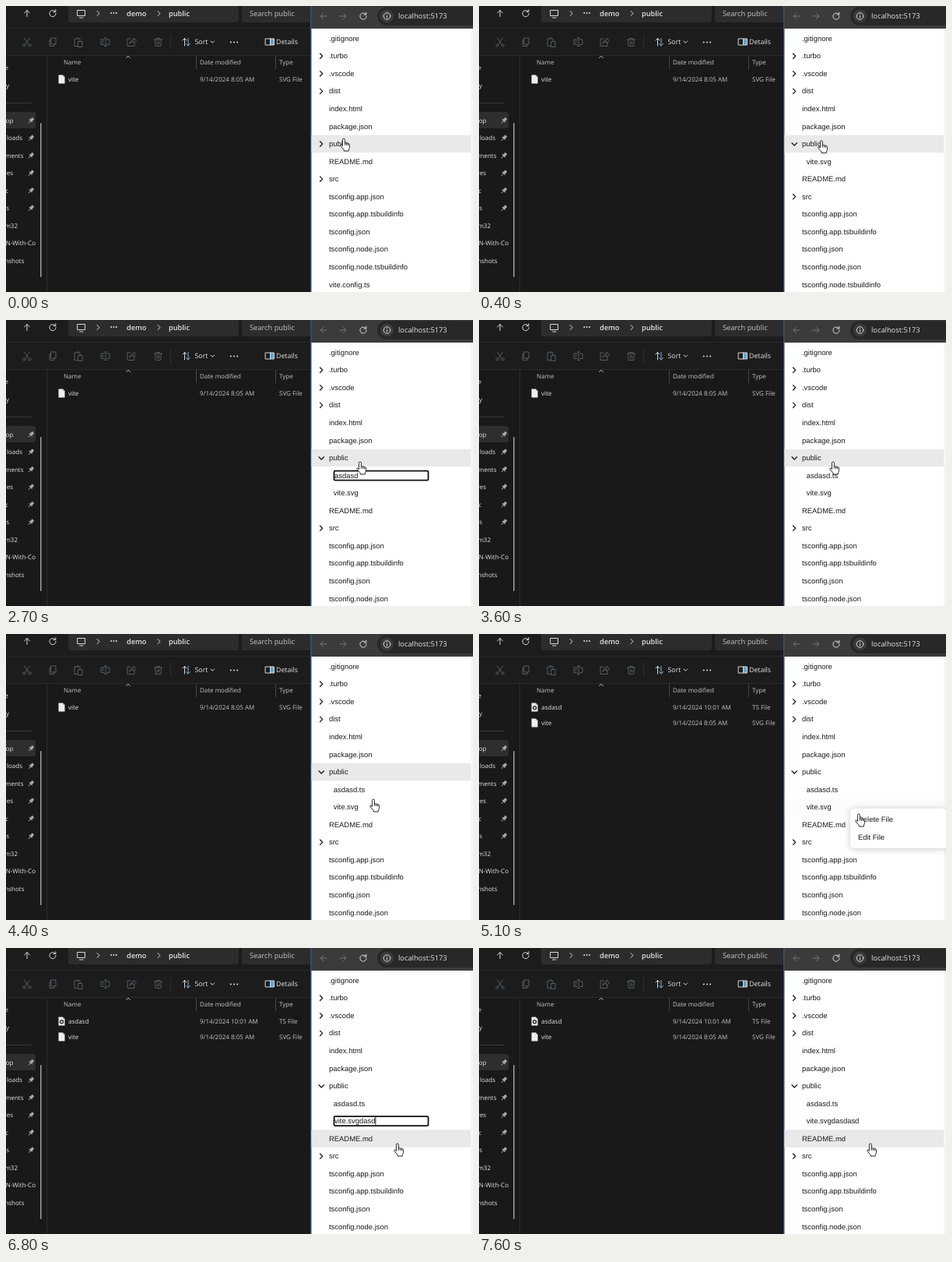
Recreate the animation shown at these times as an HTML page. Size 600 px wide and 367 px high, loop 8 s.

```html
<!DOCTYPE html>
<html lang="en">
<head>
<meta charset="utf-8">
<title>File tree demo</title>
<style>
  html, body { margin: 0; width: 100%; height: 100%; overflow: hidden; background: #191919; }
  svg { display: block; width: 600px; height: 367px; }
  text { font: 8px "Open Sans", "Noto Sans", sans-serif; fill: #e4e4e4; white-space: pre; text-rendering: geometricPrecision; }
  .bar { font-size: 9.3px; }
  .crumb { font-size: 9.2px; font-weight: 600; }
  .tool { font-size: 8.8px; }
  .soft { fill: #c4c4c4; }
  .tree { font: 9.43px "Liberation Sans", Arial, sans-serif; fill: #1c1c1c; }
  .line { fill: none; stroke: #d8d8d8; stroke-linecap: round; stroke-linejoin: round; }
  .dim { stroke: #565b61; }
  .menu { fill: #fff; filter: drop-shadow(0 1px 4px rgba(0, 0, 0, .22)); }
</style>
</head>
<body>
<svg viewBox="0 0 600 367"><g id="windows"></g><g id="live"></g></svg>
<script>
const LOOP = 8000, STEP = 100, FADE = 120, BLINK = 500;
const ROW_TOP = 41.5, ROW_HEIGHT = 22.55;

const text = (x, y, s, cls = '', extra = '') => `<text x="${x}" y="${y}" class="${cls}" ${extra}>${s}</text>`;
const rect = (x, y, w, h, fill, r = 0, extra = '') =>
  `<rect x="${x}" y="${y}" width="${w}" height="${h}" rx="${r}" fill="${fill}" ${extra}/>`;
const line = (d, cls = '', extra = '') => `<path d="${d}" class="line ${cls}" ${extra}/>`;
const dots = (x, y, gap) => [-gap, 0, gap].map(dx => `<circle cx="${x + dx}" cy="${y}" r="1" fill="#e0e0e0"/>`).join('');
const reload = (x, y) => line(`M${x + 3.4} ${y - 2.2}a4.1 4.1 0 1 0 .7 2.2M${x + 3.8} ${y - 4.8}v2.9h-2.9`);

function explorer() {
  const top = rect(0, 0, 392, 367, '#191919') + rect(0, 0, 392, 64, '#1c1c1c') +
    rect(80, -6, 219, 27, '#2c2c2c', 3) + rect(303, -6, 92, 27, '#2c2c2c', 3) +
    rect(0, 28, 392, 1, '#2a2a2a') + rect(0, 63, 392, 1, '#2a2a2a') +
    line('M27 13.5V5.5M23.5 9l3.5-3.5L30.500 9') + reload(60, 9.5) +
    line('M92 5.500h9.500v7h-9.500zM94.500 15h4.500') + line('M117 6.500l3 3-3 3M195 6.500l3 3-3 3') + dots(138.5, 9, 3.3) +
    text(155, 13, 'demo', 'crumb') + text(209, 13, 'public', 'crumb') + text(313, 13, 'Search public', 'bar soft');

  const tools =
    line('M23.500 41l5.500 8M30.500 41l-5.500 8M25 50.500a1.600 1.600 0 1 1-3.200 0a1.600 1.600 0 1 1 3.200 0M32.200 50.500a1.600 1.600 0 1 1-3.200 0a1.600 1.600 0 1 1 3.200 0', 'dim') +
    line('M58 41h6v8h-6zM58 43.500h-2v8h6v-2.500', 'dim') +
    line('M95 45v-3h-7v9.500h4M91 41h2M93 45.500h5v7h-5z', 'dim') +
    line('M126 43h-4v6.500h4M130 43h3v6.500h-3M128 41v10.500M126.500 41h3M126.500 51.500h3M124 47.500l1-3', 'dim') +
    line('M160 42h-4v9.500h9v-3M159 48q.5-4.500 5-4.500v-2.500l3.500 3.500-3.500 3.500v-2.500q-3-.2-5 2.500', 'dim') +
    line('M190.500 43h10M193.500 43v-1.500h4V43M191.500 43l.8 8.500h6.400l.8-8.500M194.500 45.500v3.500M196.500 45.500v3.500', 'dim') +
    rect(211, 37, 1, 19, '#2e2e2e') +
    line('M229.500 51v-9.500M227 44l2.500-2.500L232 44') + line('M234 41.500v9.500M231.500 48.500l2.500 2.500 2.500-2.500', '', 'style="stroke:#7fb6dc"') +
    text(242.5, 49.3, 'Sort', 'tool') + line('M263 45l2.300 2.300 2.300-2.300') + dots(293, 46.5, 4.2) +
    rect(339.5, 42, 5, 8, '#5fa5d3') + line('M333.500 42h11v8h-11zM339.500 42v8') + text(347, 49.3, 'Details', 'tool');

  const places = [['e', 3], ['y', 4], , ['op', 9.5], ['loads', 21], ['ments', 22.5], ['res', 9], ['c', 3], ['s', 4], ['m32', 15], ['N-With-Co', 38], ['nshots', 23.5]];
  const side = rect(-5, 136, 43, 21, '#2e2e2e', 3) + rect(0, 124, 33, 1, '#3a3a3a') +
    places.map(([s, right], i) => text(right, 82 + i * 22.5, s, '', 'text-anchor="end"')).join('') +
    [0, 1, 2, 3, 4, 5].map(i => `<g transform="translate(32 ${147 + i * 22.5}) rotate(45)">` +
      '<path d="M-1.700-4.200h3.400v3.400l1.400 1.700h-6.200l1.400-1.700zM-.4.900h.8v3.600h-.8z" fill="#a9a9a9"/></g>').join('') +
    rect(38, 290, 6, 50, '#191919') + rect(44, 150, 1.6, 198, '#999', .8) + rect(52, 64, 1, 303, '#2f2f2f');

  const header = text(74, 75.3, 'Name', 'soft') + text(249, 75.3, 'Date modified', 'soft') + text(351, 75.3, 'Type', 'soft') +
    rect(244, 64, 1, 17, '#454545') + rect(346, 64, 1, 17, '#454545') + line('M154.500 66.500l2.500-2.300 2.500 2.300', '', 'stroke-width=".8"');
  return top + tools + side + header;
}

function browser() {
  return rect(392, 0, 208, 29, '#3b3b3b') + rect(477, 1, 140, 24, '#282828', 12) +
    line('M412 13h-8M407.500 9.500L404 13l3.500 3.500M429 13h8M433.500 9.500l3.500 3.500-3.500 3.500', '', 'style="stroke:#747474"') +
    reload(459, 13) + '<circle cx="489.500" cy="13" r="8.500" fill="#3b3b3b"/><circle cx="489.500" cy="13" r="4.300" class="line"/>' +
    line('M489.500 12.700v2.400M489.500 10.800v.1') + text(504, 16.3, 'localhost:5173', 'bar') +
    rect(392, 29, 208, 338, '#fff') + rect(597, 29, 3, 338, '#f6f6f6') + rect(391, 0, 1.5, 367, '#34507f');
}

function fileRow(y, name, date, type) {
  const page = `<path d="M67.500 ${y - 5.5}h5.500l2.500 2.500v8.500h-8z" fill="#eee"/><path d="M73 ${y - 5.5}v2.500h2.500z" fill="#aaa"/>`;
  const gear = type === 'TS' ? `<circle cx="71.500" cy="${y + .7}" r="2" fill="none" stroke="#333" stroke-width="1.500"/>` : '';
  return page + gear + text(80, y + 3, name) + text(249, y + 3, date, 'soft') + text(351, y + 3, type + ' File', 'soft');
}

function files(t) {
  const added = t >= 4700;
  return (added ? fileRow(94, 'asdasd', '9/14/2024 10:01 AM', 'TS') : '') +
    fileRow(added ? 114 : 94, 'vite', '9/14/2024 8:05 AM', 'SVG');
}

// Each edit: opening time, closing time, starting text, first caret time, typed text, key times
const edits = [
  { from: 900, to: 3600, start: '', caret: 900, typed: 'asdasd.ts', keys: [1700, 1800, 1900, 2100, 2150, 2200, 2800, 3100, 3200] },
  { from: 5600, to: 7600, start: 'vite.svg', caret: 5700, typed: 'dasdasd', keys: [6500, 6600, 6700, 6800, 7000, 7100, 7200] },
];
const value = (e, t) => e.start + e.typed.slice(0, e.keys.filter(k => k <= t).length);

const letterWidths = { a: .556, s: .5, d: .556, '.': .278, t: .278, v: .5, i: .222, e: .556, g: .556 };
const measure = s => [...s].reduce((w, c) => w + letterWidths[c] * 9.43, 0);

function input(e, t, y) {
  const s = value(e, t), last = Math.max(e.caret, ...e.keys.filter(k => k <= t));
  const on = t >= e.caret && Math.floor((t - last) / BLINK) % 2 === 0;
  return rect(421.5, y - 5.7, 121, 12, '#fff', 1.5, 'stroke="#101010" stroke-width="1.800"') +
    text(422, y + 3.3, s, 'tree') + (on ? rect(422 + measure(s), y - 5, .9, 10.5, '#111') : '');
}

const hovers = { public: [[-FADE, 500], [875, 4400]], 'vite.svg': [[4400, 5000]], 'README.md': [[5750, LOOP + FADE]] };
const clamp = v => Math.max(0, Math.min(1, v));
const glow = (name, t) => Math.max(0, ...(hovers[name] || []).map(([a, b]) => Math.min(clamp((t - a) / FADE), clamp(1 - (t - b) / FADE))));

const folders = ['.turbo', '.vscode', 'dist', 'public', 'src'];
function tree(t) {
  const open = t >= 200, [create, rename] = edits;
  const rows = ['.gitignore', '.turbo', '.vscode', 'dist', 'index.html', 'package.json', 'public'].map(name => ({ name }));
  if (open && t >= create.from) rows.push({ name: value(create, t), child: true, edit: create });
  if (open) rows.push({ name: t < rename.from ? 'vite.svg' : value(rename, t), child: true, edit: rename });
  rows.push(...['README.md', 'src', 'tsconfig.app.json', 'tsconfig.app.tsbuildinfo', 'tsconfig.json',
    'tsconfig.node.json', 'tsconfig.node.tsbuildinfo', 'vite.config.ts'].map(name => ({ name })));

  return rows.map(({ name, child, edit }, i) => {
    const y = ROW_TOP + i * ROW_HEIGHT, light = glow(name, t);
    let out = light ? rect(392.5, y - 11.2, 204.5, ROW_HEIGHT, '#e9e9e9', 0, `opacity="${light}"`) : '';
    if (folders.includes(name)) {
      const arrow = name === 'public' && open ? `M402 ${y - 1}l3.200 3.200 3.200-3.200` : `M403.500 ${y - 3}l3.200 3.200-3.200 3.200`;
      out += line(arrow, '', 'style="stroke:#1c1c1c" stroke-width="1.300"');
    }
    return out + (edit && t >= edit.from && t < edit.to ? input(edit, t, y) : text(child ? 420.8 : 415, y + 3.3, name, 'tree'));
  }).join('');
}

const menus = [
  { from: 500, to: 850, x: 443, y: 174, items: ['Create File', 'Create Folder', 'Delete Folder', 'Edit Folder'] },
  { from: 4800, to: 5600, x: 477, y: 224, items: ['Delete File', 'Edit File'] },
];
const menu = ({ x, y, items }) => `<rect class="menu" x="${x}" y="${y}" width="125" height="${6 + items.length * 22.5}" rx="6"/>` +
  items.map((s, i) => text(x + 10, y + 17.3 + i * 22.5, s, 'tree')).join('');

// Pointer tip: time, x, y
const path = [[0, 434, 170], [200, 434, 170], [500, 443, 174], [600, 443, 174], [800, 455, 182], [4300, 455, 182],
  [4400, 472, 212], [4600, 477, 224], [4800, 477, 224], [5100, 488, 231], [5200, 490, 234], [5400, 503, 251], [LOOP, 503, 251]];
function pointer(t) {
  const i = path.findIndex(p => p[0] > t), [a, x, y] = path[i - 1], [b, u, v] = path[i], k = (t - a) / (b - a);
  return `<g transform="translate(${x + (u - x) * k} ${y + (v - y) * k})" stroke="#111" stroke-width=".9" stroke-linejoin="round">` +
    '<path fill="#fff" d="M-1.600 9.500V1.600a1.500 1.500 0 0 1 3 0V6q1.100-.7 2.100.2q1.200-.5 2 .4q1.600-.2 1.900 1.200V11.500q0 1.500-1.100 2.700V16H.2V14.500L-4 9.800q-.7-1.600.7-2z"/>' +
    '<path fill="none" d="M1.400 6v2.700M3.500 6.200v2.700M5.500 6.600v2.500"/></g>';
}

const live = document.getElementById('live');
document.getElementById('windows').innerHTML = explorer() + browser();
let shown = -1;
function draw(now) {
  const t = Math.floor(now % LOOP / STEP) * STEP;
  if (t !== shown) {
    shown = t;
    live.innerHTML = files(t) + tree(t) + menus.filter(m => t >= m.from && t < m.to).map(menu).join('') + pointer(t);
  }
  requestAnimationFrame(() => draw(performance.now() - begin));
}
const begin = performance.now();
draw(0);
</script>
</body>
</html>
```
